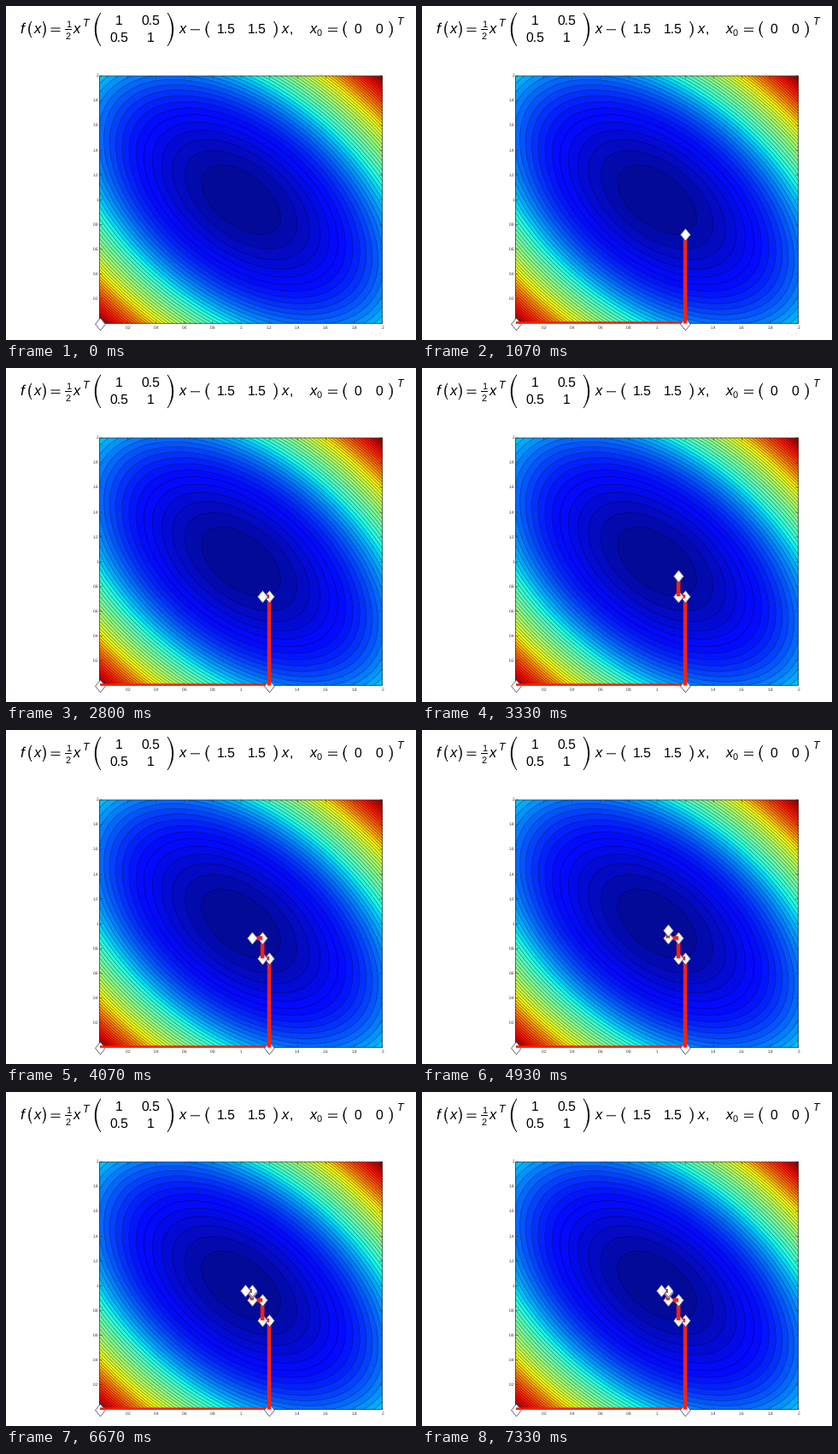
These frames come from a looping animation (480x392 px, 7.39 s). A matplotlib script:

```python
import numpy as np
import matplotlib.pyplot as plt
from matplotlib.animation import FuncAnimation
from matplotlib.colors import ListedColormap
from matplotlib.patches import PathPatch, Rectangle
from matplotlib.path import Path

W, H, DPI = 480, 392, 100
LOOP, FRAMES = 7390, 111
HOLD = 14  # frames per descent step
LEFT, RIGHT, TOP, BOTTOM = 109.6, 440.6, 82, 372.7
PT = 72 / DPI
RED = "#f5230c"
INK = "#333333"

plt.rcParams["font.family"] = "Liberation Sans"
plt.rcParams["text.hinting"] = "none"
fig = plt.figure(figsize=(W / DPI, H / DPI), dpi=DPI, facecolor="white")
ax = fig.add_axes([0, 0, 1, 1])
ax.set(xlim=(0, W), ylim=(H, 0))
ax.axis("off")


def px(x):
    return LEFT + (RIGHT - LEFT) * x / 2


def py(y):
    return BOTTOM - (BOTTOM - TOP) * y / 2


def label(x, y, s, size=15.8, **kw):
    kw = {"ha": "center", "va": "baseline", "color": "black", **kw}
    ax.text(x, y, s, fontsize=size * PT, **kw)


def var(x, y, s, size=16.5):
    label(x, y, s, size, style="italic")


def rule(x0, x1, y, lw=1):
    ax.plot([x0, x1], [y, y], color="black", lw=lw * PT,
            solid_capstyle="butt", snap=False)


def equals(x):
    rule(x, x + 11, 26)
    rule(x, x + 11, 29.6)


def paren(x, y0, y1, bulge, thick=1.2):
    """Crescent from y0 to y1 whose belly lies `bulge` away from its tips."""
    a, b = y0 + (y1 - y0) * 0.28, y1 - (y1 - y0) * 0.28
    out, inner = x + bulge * 4 / 3, x + (bulge - np.copysign(thick, bulge)) * 4 / 3
    verts = [(x, y0), (out, a), (out, b), (x, y1), (inner, b), (inner, a), (x, y0)]
    codes = [Path.MOVETO] + [Path.CURVE4] * 6
    ax.add_patch(PathPatch(Path(verts, codes), fc="black", ec="black", lw=0.4 * PT))


def formula():
    var(19, 32, "f", 17.5)
    paren(30, 18, 37, -3.6)
    var(36.5, 32, "x")
    paren(43, 18, 37, 3.6)
    equals(52.5)
    label(73, 25, "1", 11)
    label(73, 39, "2", 11)
    rule(69, 77, 27.5)
    var(83, 32, "x")
    var(94, 24, "T", 12.5)
    paren(111, 8, 47, -7, 1.6)
    paren(189, 8, 47, 7, 1.6)
    for x, y, s in ((132, 22, "1"), (169.5, 22, "0.5"), (132, 42, "0.5"), (169, 42, "1")):
        label(x, y, s)
    var(206.5, 32, "x")
    rule(216, 227, 27.8)
    paren(238, 18, 37, -4.2)
    label(257.5, 32, "1.5")
    label(294, 32, "1.5")
    paren(313.5, 18, 37, 4.2)
    var(327, 32, "x")
    label(334, 32, ",")
    var(360, 32, "x")
    label(367, 34.5, "0", 11)
    equals(377)
    paren(399, 18, 37, -4.2)
    label(411.5, 32, "0")
    label(436.5, 32, "0")
    paren(448.5, 18, 37, 4.2)
    var(462, 21.5, "T", 12.5)


def soft_jet():
    """Jet with darker greens and slightly lifted blacks."""
    rgb = plt.get_cmap("jet")(np.linspace(0, 1, 256))[:, :3]
    lift = np.array([0.01, 0.04, 0.02])
    return ListedColormap(lift + (1 - lift) * rgb ** [0.85, 1.35, 0.85])


def contours():
    x, y = np.meshgrid(np.linspace(0, 2, 101), np.linspace(0, 2, 101))
    f = 0.5 * (x * x + x * y + y * y) - 1.5 * (x + y)
    levels = np.linspace(-1.5, 0, 52)
    ax.contourf(px(x), py(y), f, levels, cmap=soft_jet(), vmin=-1.5, vmax=-0.015)
    ax.contour(px(x), py(y), f, levels[1:-1], colors="black",
               linewidths=0.5 * PT, linestyles="solid", alpha=0.65)


def axes_box():
    ax.add_patch(Rectangle((LEFT, TOP), RIGHT - LEFT, BOTTOM - TOP, snap=False,
                           fill=False, ec=INK, lw=0.7 * PT, zorder=3))
    tick = dict(color=INK, lw=0.5 * PT, zorder=3, snap=False)
    for k in range(1, 11):
        v = k / 5
        x, y = px(v), py(v)
        ax.plot([x, x], [BOTTOM, BOTTOM - 3], **tick)
        ax.plot([x, x], [TOP, TOP + 3], **tick)
        ax.plot([LEFT, LEFT + 3], [y, y], **tick)
        ax.plot([RIGHT, RIGHT - 3], [y, y], **tick)
        label(x, 379.3, f"{v:g}", 4.8, color=INK)
        label(108.3, y, f"{v:g}", 4.8, ha="right", va="center", color=INK)


def descent(coords, rate=0.8):
    """Coordinate descent path on the quadratic, starting at the origin."""
    q, b = np.array([[1, 0.5], [0.5, 1]]), np.array([1.5, 1.5])
    pts = [np.zeros(2)]
    for i in coords:
        p = pts[-1].copy()
        p[i] -= rate * (q[i] @ p - b[i])
        pts.append(p)
    return [(px(p[0]), py(p[1])) for p in pts]


formula()
contours()
axes_box()

path = descent([0, 1, 0, 1, 0, 1, 1, 0])
clip = Rectangle((LEFT, TOP), RIGHT - LEFT, BOTTOM - TOP, transform=ax.transData)
diamond = Path([(0, -1), (0.82, 0), (0, 1), (-0.82, 0), (0, -1)], closed=True)
steps = []
for k, (x, y) in enumerate(path):
    group = []
    if k:
        x0, y0 = path[k - 1]
        line, = ax.plot([x0, x], [y0, y], color=RED, lw=4.6 * PT, snap=False,
                        solid_capstyle="butt", zorder=4 + k)
        line.set_clip_path(clip)
        group.append(line)
    mark, = ax.plot(x, y, marker=diamond, ms=14.5 * PT, mfc="white", mec="#4a4f78",
                    mew=0.7 * PT, zorder=4.5 + k, snap=False)
    steps.append(group + [mark])


def update(n):
    done = (n + HOLD - 1) // HOLD
    artists = []
    for k, group in enumerate(steps):
        for artist in group:
            artist.set_visible(k <= done)
            artists.append(artist)
    return artists


anim = FuncAnimation(fig, update, frames=FRAMES, interval=LOOP / FRAMES,
                     repeat=True, repeat_delay=0, blit=False)
plt.show()
```
